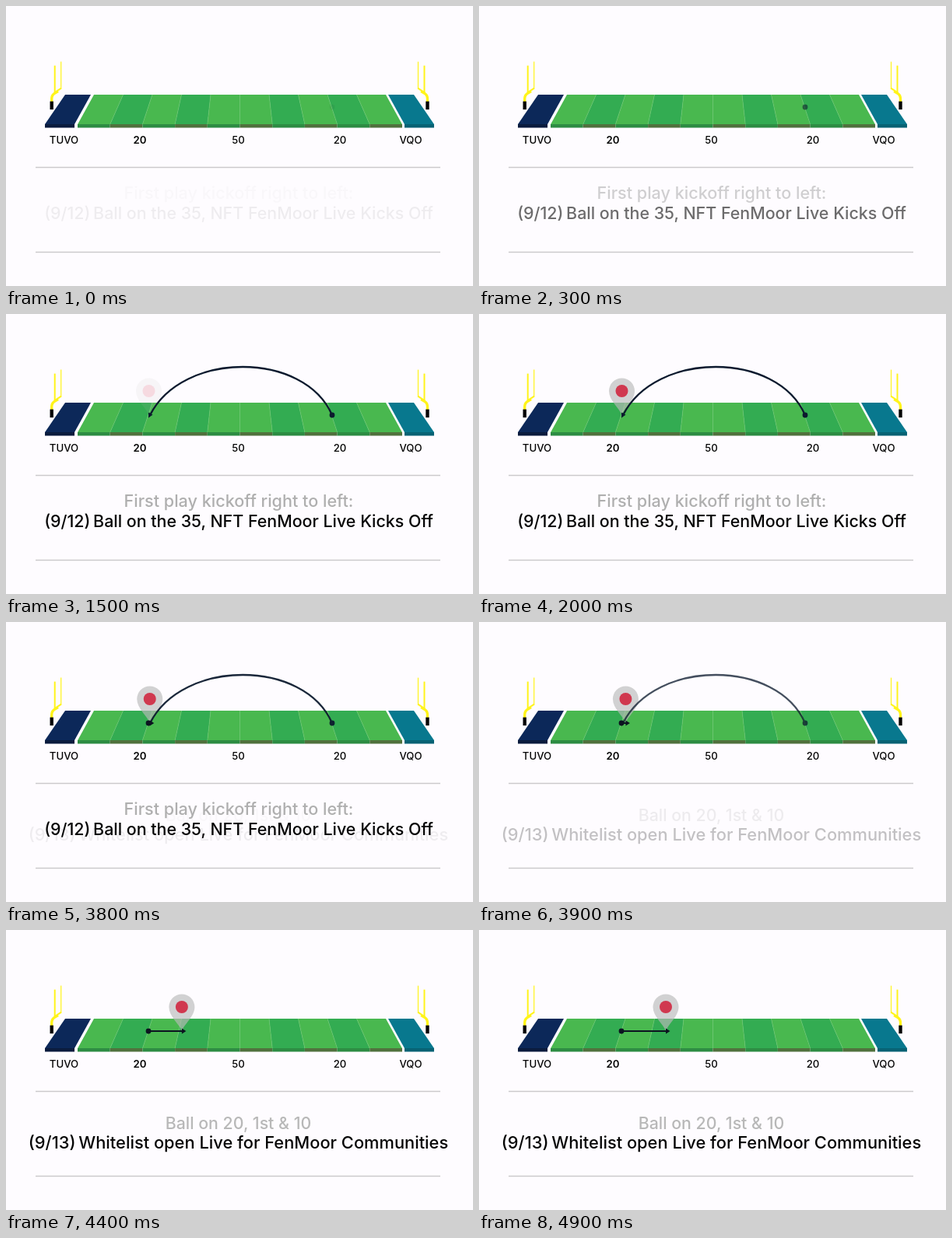
These frames come from a looping animation (600x360 px, 5000 ms). An HTML page:

```html
<!DOCTYPE html>
<html lang="en">
<head>
<meta charset="utf-8">
<title>Kickoff drive</title>
<style>
  html, body { margin: 0; width: 100%; height: 100%; overflow: hidden; background: #fefcff; }
  svg { display: block; width: 600px; height: 360px; }
  text { font-family: Inter, sans-serif; font-weight: 500; text-anchor: middle; fill: #050505; }
  .labels text { font-size: 13.2px; }
  .caption .lead { fill: #afafaf; font-size: 21.6px; }
  #first { font-size: 21.4px; }
  #second { font-size: 21.85px; }
  #second .lead { fill: #b8b8b8; font-size: 21.3px; }
</style>
</head>
<body>
<svg viewBox="0 0 600 360">
  <defs>
    <g id="post" fill="none" stroke="#fff419">
      <path d="M58.7 123V119Q58.7 114 62 112L67 109" stroke-width="3.4"/>
      <path d="M62 111L71 105" stroke-width="2"/>
      <path d="M62.7 76V112" stroke-width="2"/>
      <path d="M70.7 71V106" stroke-width="1.2"/>
      <path d="M58.7 122V132.5" stroke="#050505" stroke-width="4.4"/>
    </g>
  </defs>

  <g id="field">
    <path d="M76 114H109L88 152H50Z" fill="#0c2859"/>
    <path d="M50 152H88V156.5H50Z" fill="#0a1b3d"/>
    <path d="M491 114H524L550 152H512Z" fill="#08788e"/>
    <path d="M512 152H550V156.5H512Z" fill="#076274"/>
  </g>
  <use href="#post" y=".6"/>
  <use href="#post" transform="matrix(-1 0 0 1 600.2 .6)"/>

  <g class="labels">
    <text x="74.5" y="177">TUVO</text>
    <text x="172" y="177" style="font-weight:600">20</text>
    <text x="298.5" y="177">50</text>
    <text x="429" y="177">20</text>
    <text x="520" y="177">VQO</text>
  </g>
  <path d="M38 207.5H558M38 316.5H558" stroke="#cbcacc" stroke-width="1.5"/>

  <g id="pin">
    <path d="M0 0C-3 -9 -16.5 -19 -16.5 -31A16.5 16.5 0 0 1 16.5 -31C16.5 -19 3 -9 0 0Z" fill="#bbb" opacity=".65"/>
    <circle cy="-31" r="8" fill="#d0384f"/>
  </g>

  <g id="kick" fill="#0c1a2e">
    <circle cx="419" cy="130" r="3.4"/>
    <path id="arc" d="M419 130C383 47.3 227 47.3 185 130" pathLength="1" fill="none" stroke="#0c1a2e" stroke-width="2.3"/>
    <path id="arcHead" d="M183 133.5L183 126.5L188.5 129.5Z"/>
  </g>

  <g id="run" fill="#0c1420">
    <circle cx="183" cy="130" r="3.4"/>
    <path id="runLine" stroke="#0c1420" stroke-width="2"/>
    <path id="runHead" d="M0 0L-5.5 -3.4V3.4Z"/>
  </g>

  <g class="caption" id="first">
    <text class="lead" x="299" y="248.3">First play kickoff right to left:</text>
    <text x="299" y="273.7">(9/12)&thinsp;Ball on the 35, NFT FenMoor Live Kicks Off</text>
  </g>
  <g class="caption" id="second">
    <text class="lead" x="298.5" y="255.7">Ball on 20, 1st &amp; 10</text>
    <text x="298.5" y="281.3">(9/13)&thinsp;Whitelist open Live for FenMoor Communities</text>
  </g>
</svg>

<script>
const LOOP = 5000, STEP = 100;
const el = id => document.getElementById(id);
const clamp = v => Math.min(1, Math.max(0, v));
const progress = (t, start, end) => clamp((t - start) / (end - start));
const set = (id, name, value) => el(id).setAttribute(name, value);
const show = (id, alpha) => set(id, 'opacity', alpha);

function addPath(d, attrs) {
  const path = document.createElementNS('http://www.w3.org/2000/svg', 'path');
  path.setAttribute('d', d);
  for (const name in attrs) path.setAttribute(name, attrs[name]);
  el('field').append(path);
}

function buildField() {
  const top = i => 113 + 37.5 * i;
  const bottom = i => 92 + 41.7 * i;
  for (let i = 0; i < 10; i++) {
    const dark = Math.min(i, 9 - i) % 2;
    addPath(`M${top(i)} 114H${top(i + 1)}L${bottom(i + 1)} 152.2H${bottom(i)}Z`,
      { fill: dark ? '#33ac52' : '#49b84f' });
    addPath(`M${bottom(i)} 152H${bottom(i + 1)}V156.5H${bottom(i)}Z`,
      { fill: i % 2 ? '#50713d' : '#2d8c43' });
  }
  for (let i = 1; i < 10; i++) {
    addPath(`M${top(i)} 114L${bottom(i)} 152`, { stroke: '#68c46c', 'stroke-width': 0.7 });
  }
}

function draw(t) {
  const fadeIn = start => t < start ? 0 : clamp(0.06 + (t - start) * 0.00175);
  const changing = t >= 3800;

  show('first', t < 3900 ? fadeIn(0) : 0);
  show('second', fadeIn(3800));

  const drawn = progress(t, 600, 1500);
  show('kick', changing ? 1 - fadeIn(3800) : fadeIn(0));
  show('arc', drawn > 0 ? 1 : 0);
  set('arc', 'stroke-dasharray', `${drawn} 2`);
  show('arcHead', drawn === 1 ? 1 : 0);

  const eased = (1 - Math.cos(Math.PI * progress(t, 3700, 4750))) / 2;
  const pinX = 183.5 + 56.5 * eased;
  const tip = pinX + 5.5;
  show('pin', progress(t, 1400, 2000));
  set('pin', 'transform', `translate(${pinX} 130)`);
  show('run', changing ? 1 : 0);
  set('runLine', 'd', `M183 130H${tip - 3}`);
  set('runHead', 'transform', `translate(${tip} 130)`);
}

buildField();
const begin = performance.now();
function frame() {
  const t = (performance.now() - begin) % LOOP;
  draw(Math.floor(t / STEP) * STEP);
  requestAnimationFrame(frame);
}
frame();
</script>
</body>
</html>
```
